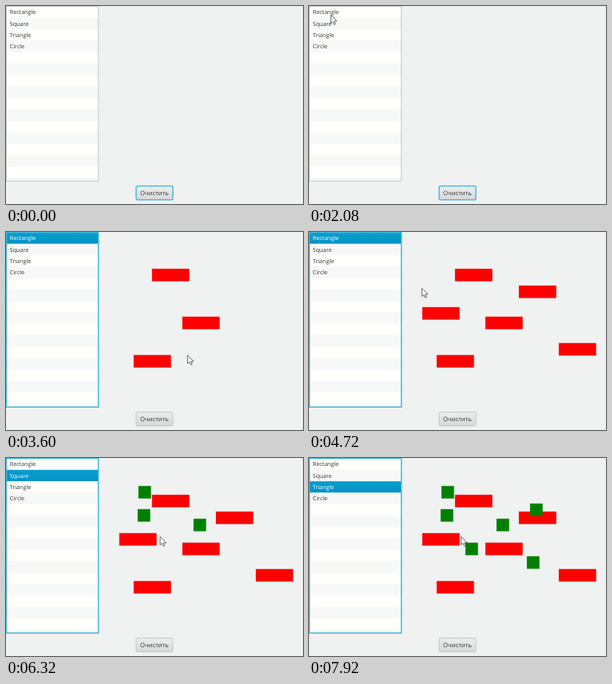
Recreate the animation shown at these times as an HTML page. Size 372 by 248 pixels, loop 8 s.

```html
<!DOCTYPE html>
<html lang="ru">
<head>
<meta charset="utf-8">
<title>Shapes</title>
<style>
html, body { margin: 0; width: 100%; height: 100%; overflow: hidden; background: #f0f2f2; }
svg { display: block; width: 100vw; height: 100vh; }
text { font-family: "Open Sans", "Noto Sans", sans-serif; fill: #333; text-rendering: geometricPrecision; }
</style>
</head>
<body>
<svg id="stage" viewBox="0 0 372 248">
  <defs>
    <linearGradient id="face" x2="0" y2="1">
      <stop offset="0" stop-color="#eeeeee"/>
      <stop offset="1" stop-color="#d6d7d7"/>
    </linearGradient>
    <linearGradient id="picked" x2="0" y2="1">
      <stop offset="0" stop-color="#0b9dcc"/>
      <stop offset="1" stop-color="#0093c6"/>
    </linearGradient>
    <clipPath id="inside"><rect width="116" height="219.3"/></clipPath>
  </defs>
  <rect width="372" height="248" fill="#f0f2f2"/>
  <g id="list" clip-path="url(#inside)"></g>
  <rect id="frame" x=".5" y=".5" width="115.2" height="218.8" fill="none"/>
  <rect id="button" x="163" y="225.6" width="46" height="17.2" rx="1.6" fill="url(#face)"/>
  <text x="186" y="237" font-size="7.7" text-anchor="middle">Очистить</text>
  <g id="shapes" stroke-opacity=".3"></g>
  <path id="cursor" d="M.4 .5V10.8L2.8 8.6 4.5 12.4 6.2 11.7 4.6 8H8Z"
        fill="#fff" stroke="#444" stroke-width=".8" stroke-linejoin="round"/>
</svg>
<script>
const LOOP = 8000, STEP = 80, ROW = 14.33;
const $ = id => document.getElementById(id);

function add(parent, tag, attrs) {
  const el = document.createElementNS("http://www.w3.org/2000/svg", tag);
  for (const k in attrs) el.setAttribute(k, attrs[k]);
  return parent.appendChild(el);
}

// Each tool is picked in the list, then stamped at a steady pace where the pointer clicks
const tools = [
  { name: "Rectangle", pick: 2240, first: 2720, gap: 384, width: 46.5, fill: "#ff0000",
    spots: [[183, 46], [221, 106], [160, 154], [313, 139], [142, 94], [263, 67]] },
  { name: "Square", pick: 5200, first: 5680, gap: 240, width: 15.5, fill: "#008000",
    spots: [[235, 76], [165, 64], [166, 35], [196, 106], [273, 123], [277, 57]] },
  { name: "Triangle", pick: 7360, spots: [] },
  { name: "Circle", pick: Infinity, spots: [] }
];

// Pointer stops without a click: time, x, y
const stops = [[960, 300, 150], [2080, 27, 11], [3600, 227, 154], [4720, 141, 70],
               [5440, 142, 53], [7040, 109, 65], [7920, 190, 98]];
const shapes = [];

const rows = Array.from({ length: 16 }, (_, i) => add($("list"), "rect", {
  x: 0, y: .5 + i * ROW, width: 116, height: ROW
}));

tools.forEach((tool, i) => {
  tool.label = add($("list"), "text", { x: 4.8, y: 10.3 + i * ROW, "font-size": 7.15 });
  tool.label.textContent = tool.name;
  if (isFinite(tool.pick)) stops.push([tool.pick, 30, ROW * (i + .7)]);
  tool.spots.forEach(([x, y], n) => {
    const at = tool.first + n * tool.gap, { width, fill } = tool;
    stops.push([at, x, y]);
    shapes.push({ at, el: add($("shapes"), "rect", { x, y: y + .2, width, height: 15.4, fill, stroke: fill }) });
  });
});
stops.sort((a, b) => a[0] - b[0]);

const easeOut = k => 1 - (1 - k) ** 2;

function pointerAt(t) {
  const i = stops.findIndex(s => s[0] > t);
  if (i < 0) return stops[stops.length - 1].slice(1);
  const [t0, x0, y0] = stops[i - 1], [t1, x1, y1] = stops[i];
  const k = easeOut((t - t0) / (t1 - t0));
  return [x0 + (x1 - x0) * k, y0 + (y1 - y0) * k];
}

function outline(id, color, width) {
  $(id).setAttribute("stroke", color);
  $(id).setAttribute("stroke-width", width);
}

function draw(t) {
  const selected = tools.filter(tool => t >= tool.pick).length - 1;
  const focused = selected >= 0;
  rows.forEach((el, i) => el.setAttribute("fill",
    i === selected ? "url(#picked)" : i % 2 ? "#f7f9f8" : "#fffffc"));
  tools.forEach((tool, i) => tool.label.style.fill = i === selected ? "#fff" : "#333");

  outline("frame", focused ? "#42b7da" : "#c5c7c7", focused ? 1.5 : 1);
  outline("button", focused ? "#bfc1c1" : "#4cb9dc", focused ? .9 : 1.5);

  for (const s of shapes) s.el.style.display = t >= s.at ? "" : "none";

  const shown = t >= stops[0][0];
  $("cursor").style.display = shown ? "" : "none";
  if (shown) $("cursor").setAttribute("transform", `translate(${pointerAt(t)})`);
}

const start = performance.now();
function tick() {
  const t = (performance.now() - start) % LOOP;
  draw(Math.floor(t / STEP) * STEP);
  requestAnimationFrame(tick);
}
tick();
</script>
</body>
</html>
```
